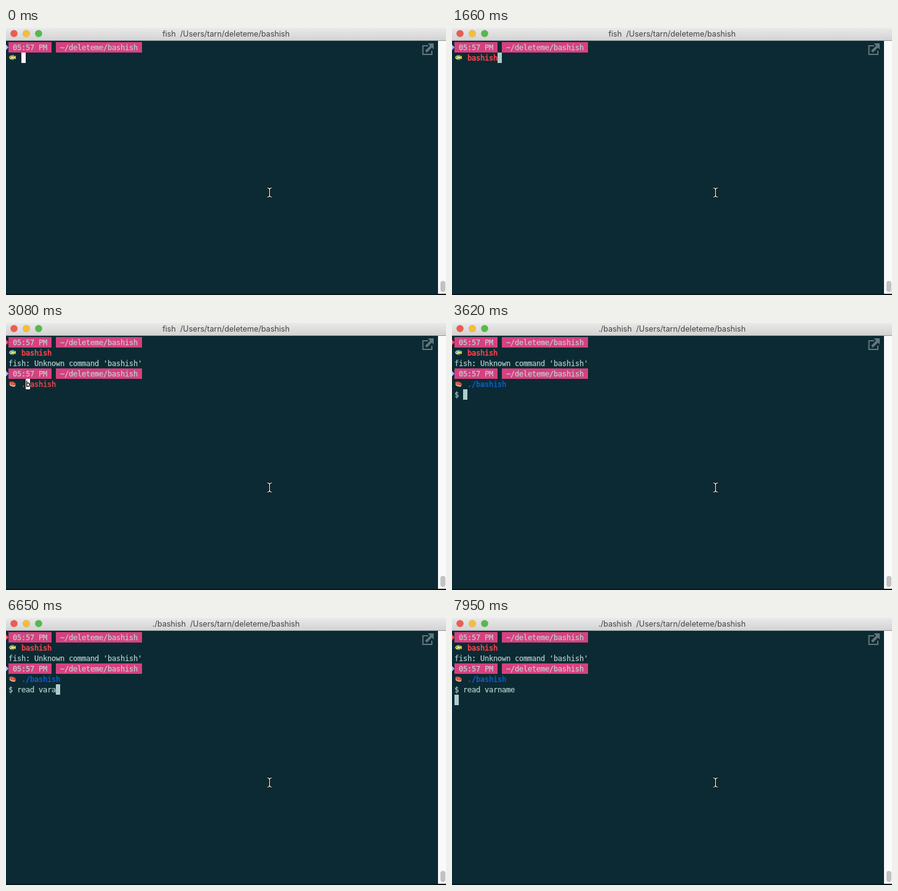
An HTML page with a canvas for the animation above (8000 ms loop, 715x435 px).

```html
<!DOCTYPE html>
<html lang="en">
<head>
<meta charset="utf-8">
<title>Terminal session</title>
<style>
  html, body { margin: 0; width: 100%; height: 100%; overflow: hidden; background: #0c2a33; }
  canvas { display: block; }
</style>
</head>
<body>
<canvas id="stage" width="715" height="435"></canvas>
<script>
const ctx = document.getElementById('stage').getContext('2d');
const LOOP = 8000, CELL = 7, ROW = 17, LEFT = 4, TOP = 23;
const BG = '#0c2a33', FG = '#aeccca', RED = '#f8444a', BLUE = '#0a62d6', PINK = '#d6417f', WHITE = '#ffffff';

// Each step: [time, typed text, cursor column]
const firstCommand = [[0, ''], [1140, 'b'], [1230, 'ba'], [1310, 'bas'], [1400, 'bash'],
  [1490, 'bashi'], [1570, 'bashis'], [1660, 'bashish']];
const secondCommand = [[2190, '', 0], [2790, 'bashish', 7], [2970, 'bashish', 0],
  [3080, '.bashish', 1], [3320, './bashish', 2]];
const shellInput = [[3500, ''], [3620, '$ '], [4570, '$ r'], [4690, '$ rea'], [4800, '$ read'],
  [4920, '$ read '], [6120, '$ read v'], [6290, '$ read va'], [6350, '$ read var'],
  [6650, '$ read vara'], [6710, '$ read varan'], [6950, '$ read vara'], [7130, '$ read var'],
  [7230, '$ read varn'], [7330, '$ read varna'], [7430, '$ read varnam'], [7530, '$ read varname']];

const stepAt = (steps, t) => steps.filter(step => step[0] <= t).pop();
const cellX = col => LEFT + col * CELL;
const rowY = row => TOP + row * ROW;

function rect(x, y, w, h, color) {
  ctx.fillStyle = color;
  ctx.fillRect(x, y, w, h);
}

function shape(points, color) {
  ctx.fillStyle = color;
  ctx.beginPath();
  points.forEach(([x, y]) => ctx.lineTo(x, y));
  ctx.fill();
}

function line(points, color, width) {
  ctx.strokeStyle = color;
  ctx.lineWidth = width;
  ctx.beginPath();
  points.forEach(([x, y], i) => i ? ctx.lineTo(x, y) : ctx.moveTo(x, y));
  ctx.stroke();
}

function oval(x, y, rx, ry, color, angle = 0) {
  ctx.fillStyle = color;
  ctx.beginPath();
  ctx.ellipse(x, y, rx, ry, angle, 0, 7);
  ctx.fill();
}

function write(text, col, row, color, weight = 0.25) {
  ctx.font = '12px "DejaVu Sans Mono", monospace';
  ctx.textAlign = 'left';
  ctx.fillStyle = ctx.strokeStyle = color;
  ctx.lineWidth = weight;
  [...text].forEach((char, i) => {
    ctx.fillText(char, cellX(col + i), rowY(row) + 13);
    ctx.strokeText(char, cellX(col + i), rowY(row) + 13);
  });
}

function cursor(col, row, color, char = '') {
  rect(cellX(col), rowY(row), CELL, ROW, color);
  write(char, col, row, '#000');
}

function fish(y) {
  shape([[12, y], [16, y - 3], [16, y + 3]], '#e9c832');
  oval(10, y, 4.4, 3.6, '#e8d440');
  oval(11, y - 2.8, 2.6, 1.5, '#4d9c9c');
  oval(11, y + 3, 2.2, 1.3, '#3d8f86');
  oval(6.8, y, 1.8, 1.8, '#8fc9c4');
  rect(7, y - 1, 1, 1, '#13252a');
  rect(10, y - 2, 1, 4, '#f7f3c4');
}

function sushi(y) {
  oval(10.5, y + 1.8, 5, 2.6, '#d9c9b8', 0.3);
  oval(10.5, y - 0.4, 5.6, 3, '#d94c36', 0.3);
  line([[8, y - 2], [7, y + 1]], '#f29a7d', 0.8);
  line([[11.5, y - 1.5], [10.5, y + 2]], '#f29a7d', 0.8);
}

function prompt(row, markColor, icon) {
  const y = rowY(row);
  shape([[0, y + 4], [4, y + 8.5], [0, y + 13]], markColor);
  rect(4, y, 70, ROW, PINK);
  rect(81, y, 140, ROW, PINK);
  write('05:57 PM', 1, row, '#bfcdd0');
  write('~/deleteme/bashish', 12, row, '#bfcdd0');
  icon(y + 25);
}

function drawWindow(program) {
  rect(0, 0, 715, 435, BG);
  const bar = ctx.createLinearGradient(0, 0, 0, 20);
  bar.addColorStop(0, '#e9e9e9');
  bar.addColorStop(1, '#d3d3d3');
  rect(0, 0, 715, 20, bar);
  rect(0, 20, 715, 1, '#8f9a9c');
  [['#ee5b50', 13], ['#f6bd36', 33], ['#53bb49', 53]].forEach(([color, x]) => {
    oval(x, 9, 6, 6, '#00000030');
    oval(x, 9, 5.6, 5.6, color);
  });
  ctx.font = '12.6px Inter, sans-serif';
  ctx.textAlign = 'center';
  ctx.fillStyle = '#434343';
  ctx.fillText(program + '  /Users/tarn/deleteme/bashish', 357.5, 14);

  rect(702, 21, 13, 412, '#fafafa');
  ctx.fillStyle = '#c2c2c2';
  ctx.beginPath();
  ctx.roundRect(706, 412, 8, 18, 4);
  ctx.fill();
  rect(0, 433, 715, 2, '#06161b');

  const gray = '#63777d';
  line([[686, 29], [677.5, 29], [677.5, 43], [692, 43], [692, 37]], gray, 2);
  line([[682.5, 38.5], [691, 30]], gray, 4);
  shape([[685.5, 25], [695, 25], [695, 35]], gray);
}

function drawPointer() {
  [['#000', 3], ['#fff', 1.2]].forEach(([color, width]) => {
    line([[424.5, 260.5], [427, 261], [428.3, 262.5], [429.6, 261], [432, 260.5]], color, width);
    line([[428.3, 262], [428.3, 274]], color, width);
    line([[424.5, 275.5], [427, 275], [428.3, 273.5], [429.6, 275], [432, 275.5]], color, width);
  });
}

function draw(t) {
  const submitted = t >= 2190, inShell = t >= 3500;
  drawWindow(inShell ? './bashish' : 'fish');

  const first = stepAt(firstCommand, t)[1];
  prompt(0, submitted ? '#f0605c' : '#a3bdf2', fish);
  write(first, 3, 1, RED, 0.6);
  if (!submitted) cursor(3 + first.length, 1, first ? FG : WHITE);

  if (submitted) {
    const [time, text, caret] = stepAt(secondCommand, t);
    write("fish: Unknown command 'bashish'", 0, 2, FG);
    prompt(3, '#a3bdf2', sushi);
    write(text, 3, 4, time >= 3320 ? BLUE : RED, 0.4);
    if (!inShell) {
      const under = text[caret] || '';
      cursor(3 + caret, 4, under || !text ? WHITE : FG, under);
    }
  }

  if (inShell) {
    const input = stepAt(shellInput, t)[1];
    write(input, 0, 5, FG);
    if (t < 7950) cursor(input.length, 5, FG);
    else cursor(0, 6, FG);
  }
  drawPointer();
}

function tick() {
  draw(performance.now() % LOOP);
  requestAnimationFrame(tick);
}
tick();
</script>
</body>
</html>
```
